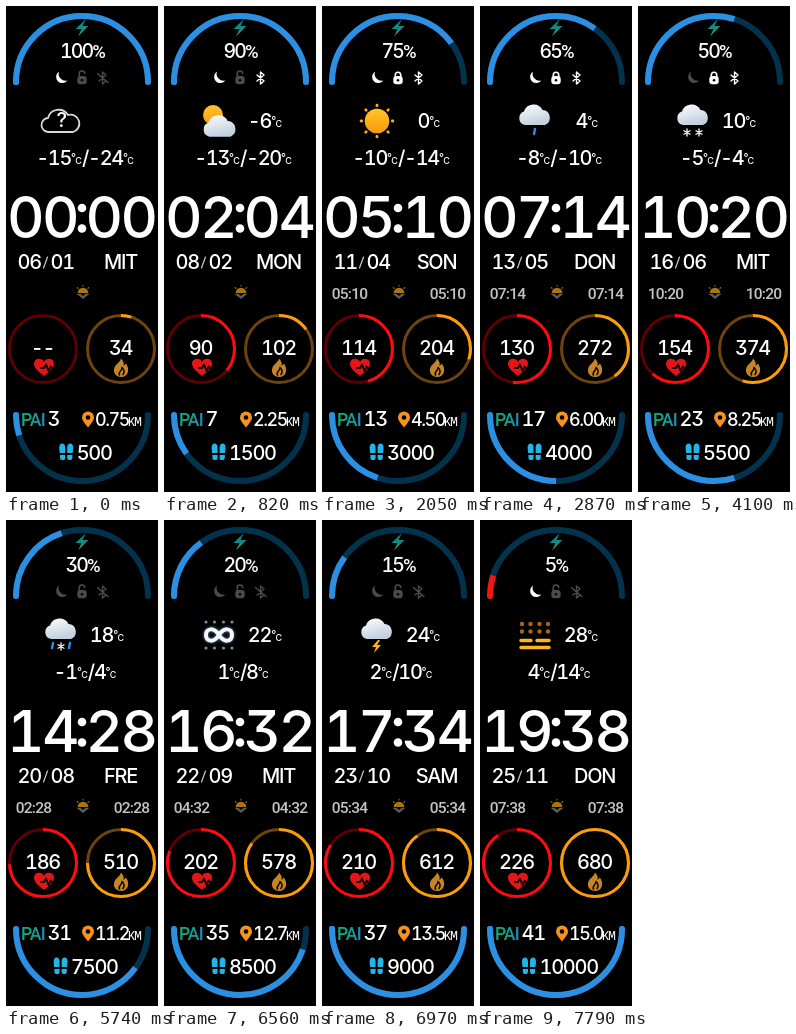
An HTML page for the animation above (8.2 s loop, 152x486 px).

```html
<!DOCTYPE html>
<html lang="de">
<head>
<meta charset="utf-8">
<title>Watch face</title>
<style>
html, body { margin: 0; width: 100%; height: 100%; overflow: hidden; background: #000; }
svg { display: block; width: 152px; height: 486px; }
text {
  font: 500 20px Inter, sans-serif; fill: #fff; letter-spacing: -1.3px;
  font-feature-settings: "tnum", "cv09";
}
.mid { text-anchor: middle; }
.end { text-anchor: end; }
.time { font-size: 58px; letter-spacing: -2.7px; }
.sun { font: 500 15.5px Roboto, sans-serif; letter-spacing: -.8px; fill: #c4c4c4; }
.deg { font-size: 11px; letter-spacing: -.8px; }
.unit { font-size: 9px; letter-spacing: 0; }
.level { font-size: 19.5px; letter-spacing: -1.9px; }
.pct { font: 500 18.5px Roboto, sans-serif; letter-spacing: 0; }
.pai { font: 500 17.5px Roboto, sans-serif; letter-spacing: -.8px; fill: url(#pai); }
.km { font: 500 12.5px "Noto Sans Mono", monospace; letter-spacing: -1.2px; }
.dist { font-size: 18px; letter-spacing: -1.5px; }
</style>
</head>
<body>
<svg viewBox="0 0 152 486">
  <defs>
    <linearGradient id="pai"><stop stop-color="#12ad7a"/><stop offset=".55" stop-color="#139f8c"/><stop offset="1" stop-color="#1a8fc8"/></linearGradient>
    <linearGradient id="bolt" x2="0" y2="1"><stop stop-color="#176f86"/><stop offset="1" stop-color="#16a37d"/></linearGradient>
    <linearGradient id="cloud" x2=".4" y2="1"><stop stop-color="#fff"/><stop offset="1" stop-color="#c3d0df"/></linearGradient>
    <linearGradient id="gold" x2="0" y2="1"><stop stop-color="#ffc52e"/><stop offset="1" stop-color="#f89a08"/></linearGradient>
    <filter id="glow" x="-30%" y="-30%" width="160%" height="160%"><feGaussianBlur stdDeviation="1.5"/></filter>
  </defs>
  <g id="face"></g>
</svg>
<script>
const STEP = 410, COUNT = 20;
const DAYS = ['SON', 'MON', 'DIE', 'MIT', 'DON', 'FRE', 'SAM'];
const BLUE = '#2d8fe2', NAVY = '#03324d';
const face = document.getElementById('face');
const pad = n => String(n).padStart(2, '0');

const text = (x, y, body, cls = '') => `<text x="${x}" y="${y}" class="${cls}">${body}</text>`;
const shape = (d, fill) => `<path d="${d}" fill="${fill}"/>`;
const line = (d, color, w = 2) =>
  `<path d="${d}" fill="none" stroke="${color}" stroke-width="${w}" stroke-linecap="round" stroke-linejoin="round"/>`;
const dot = (x, y, r, fill) => `<circle cx="${x}" cy="${y}" r="${r}" fill="${fill}"/>`;
const at = (x, y, body, scale = 1) => `<g transform="translate(${x} ${y}) scale(${scale})">${body}</g>`;
const celsius = '<tspan class="deg" dy="-4">°</tspan><tspan class="unit" dy="3">C</tspan>';

// Track plus its filled part, part from 0 to 1
function gauge(d, part, dim, bright, w, cap) {
  const base = `d="${d}" fill="none" stroke-width="${w}"`;
  return `<path ${base} stroke="${dim}" stroke-linecap="${cap}"/>` + (part > 0
    ? `<path ${base} stroke="${bright}" stroke-linecap="${part < 1 ? 'butt' : cap}" pathLength="100" stroke-dasharray="${part * 100} 200"/>` : '');
}
const ring = (x, part, dim, bright) =>
  gauge(`M${x} 309.5a33.5 33.5 0 0 1 0 67a33.5 33.5 0 0 1 0-67`, part, dim, bright, 3, 'butt');
const bow = (y, sweep, part, color) =>
  gauge(`M10 ${y}a66 66 0 0 ${sweep} 132 0`, part, NAVY, color, 6, 'round') + dot(10, y, 3, color);

// Weather parts, centred on 0,0
const cloud = shape('M-10 4a7 7 0 0 1-1-13.5a10 10 0 0 1 18.5-1.5a7.8 7.8 0 0 1 2.5 15z', 'url(#cloud)');
const each = (xs, draw) => xs.map(draw).join('');
const drops = (...xs) => each(xs, x => line(`M${x} 8l-1 5`, '#2f8fe8', 2.4));
const flakes = (...xs) => each(xs, x =>
  line(`M${x} 8v7M${x - 3} 9.8l6 3.4M${x - 3} 13.2l6-3.4`, '#fff', 1.3));
const bolt = shape('M1 5l-6 7h4l-2 6 7-8h-4l3-5z', '#ffb51c');
const rows = (ys, color, r = 2.2) => each(ys, y => each([-13, -4.5, 4.5, 13], x => dot(x, y, r, color)));
const bars = color => line('M-14 5.5h10M2 5.5h12M-14 12.5h28', color, 3.5);
const rays = each([...Array(8).keys()], i =>
  `<g transform="rotate(${i * 45})">${line('M0-15.3v-.6', '#ffae18', 2.8)}</g>`);
const loop = 'M0 0C-5-8-13-7-13 0S-5 8 0 0S13-7 13 0S5 8 0 0';

const WEATHER = [
  dot(-6, -6, 10, 'url(#gold)') + at(1, 11.5, cloud, 1.04),
  dot(-6, -7, 8, 'url(#gold)') + cloud + drops(-6, 6),
  dot(-6, -7, 8, 'url(#gold)') + cloud + flakes(0),
  dot(0, 0, 12.3, 'url(#gold)') + rays,
  at(0, 5, cloud),
  cloud + drops(0),
  cloud + flakes(0),
  cloud + drops(-6, 6),
  cloud + flakes(-6, 6),
  cloud + flakes(-10, 0, 10),
  cloud + drops(-9, 0, 9),
  rows([-11, -3.5], '#a4610c') + bars('#ffae18'),
  cloud + drops(-8, 9) + flakes(0),
  cloud + line('M-13 9h26M-9 14h18', '#b9c6d6', 2.2),
  rows([-13, 13], '#7d8ba0', 1.6) +
    `<g filter="url(#glow)" opacity=".6">${line(loop, '#7fa6dc', 5)}</g>` + line(loop, '#f4f7fb', 4),
  cloud + bolt,
  cloud + flakes(-10, 0, 10) + line('M-9 18h18', '#b9c6d6', 1.5),
  rows([-11, -3.5], '#a8640f') + bars('#ffb41c')
];
const UNKNOWN = line('M-12 11a7 7 0 0 1-1-14a11 11 0 0 1 20-3a8.7 8.7 0 0 1 5 17z', '#d9d9d9', 1.8) +
  text(0, 6, '?', 'mid');

function status(k) {
  const color = on => on ? '#fff' : '#4b4b4b';
  const lock = k > 3 && k < 13, c = color(lock);
  const radio = k > 0 && k < 12, b = color(radio);
  return shape('M53 65.5a6.3 6.3 0 1 0 8.5 9a7 7 0 0 1-8.500-9z', color(k < 8 || k > 17)) +
    `<rect x="71.300" y="70" width="9.400" height="8.200" rx="3" fill="${c}"/>` +
    line(lock ? 'M73.300 71v-2a2.700 2.700 0 0 1 5.400 0v2' : 'M73.300 71v-3a2.700 2.700 0 0 1 5.400-.500', c, 1.6) +
    dot(76, 74.2, 1.3, '#000') +
    line('M93 69l7 6-3.500 3v-12l3.500 3-7 6' + (radio ? '' : 'M91.500 67.500l10.500 9'), b, 1.4);
}

const icons =
  shape('M80 13L69.5 23h6L72 30.5 82.5 20h-6z', 'url(#bolt)') +
  at(77, 287,
    shape('M-6.500 0a6.500 6.500 0 0 1 13 0z', '#a87512') +
    line('M0-8.500v-1M-6-5.500l-1-1M6-5.500l1-1', '#a87512', 1.3) +
    shape('M-8 .800h5l3 3 3-3h5l-8 6.500z', '#5c5c5c'), .82) +
  shape('M38 370C31 364.500 28 361.500 28 357.500C28 352 36 351 38 356C40 351 48 352 48 357.500C48 361.500 45 364.500 38 370z', '#e31515') +
  line('M35 362h3l2-3.500 2.500 6.500 2.200-4.500 1.300 1.500h4', '#000', 1.8) +
  shape('M115 352.500C118 356 118 357.500 117.500 360L120 357.500C124.500 364 121.500 371 115.500 371C108.500 371 106 365 109.500 359.500C112 357 114.500 355 115 352.500z', '#c58428') +
  line('M113.500 369c-2-3 3-4.500 2.500-7.500c3 3 2.500 5 1 7', '#100a02', 1.6) +
  `<path d="M82 421.500C78 416.500 76 414 76 411.500a6 6 0 0 1 12 0C88 414 86 416.500 82 421.500z" fill="#f59220"/>` +
  dot(82, 411.5, 2.3, '#000');

const foot = 'M1 4.500a3 4.500 0 0 1 6 0V9.500H1.500zM1.800 11.500H7V14a2.600 2.600 0 0 1-5.200 0z';
const feet = shape(foot, '#22b5e8') +
  `<g transform="matrix(-1 0 0 1 16 0)">${shape(foot, '#22b5e8')}</g>`;

function draw(k) {
  const battery = 100 - 5 * k, steps = 500 + 500 * k;
  const tenths = (v, unit) => Math.min(1, Math.floor(v / unit + 1) / 10);
  const day = 6 + k, month = 1 + Math.round(k * 10 / 19);
  const weekday = DAYS[new Date(2021, month - 1, day).getDay()];
  const pulse = 74 + 8 * k, energy = 34 + 34 * k;
  const km = (.75 * (k + 1)).toFixed(2).slice(0, 4);
  const clock = `${pad((k + 11) % 12 + 1)}:${pad(2 * k)}`;
  const width = String(steps).length * 11.2;
  const left = 78.5 - (19 + width) / 2;
  const charge = tenths(battery, 10);

  return bow(76, 1, charge, charge > .1 ? BLUE : '#f51414') +
    bow(409, 0, tenths(steps, 1000), BLUE) +
    text(77, 51.5, `${battery}<tspan class="pct">%</tspan>`, 'level mid') +
    status(k) +
    at(55, 115, WEATHER[k - 2] || UNKNOWN) +
    (k > 1 ? text(118, 122, 2 * k - 10 + celsius, 'end') : '') +
    text(79, 159, `${k - 15}${celsius}<tspan dy="1">/</tspan>${2 * k - 24}${celsius}`, 'mid') +
    text(36, 232, pad(k), 'time mid') +
    text(114.5, 232, pad(2 * k), 'time mid') +
    dot(76, 202, 4.3, '#fff') + dot(76, 222.5, 4.3, '#fff') +
    text(11.5, 263, pad(day)) + line('M37.500 262l4-11', '#ccc', 1.2) + text(44.5, 263, pad(month)) +
    text(114.5, 263, weekday, 'mid') +
    (k > 2 ? text(27.5, 293, clock, 'sun mid') + text(125.5, 293, clock, 'sun mid') : '') +
    ring(37, k ? pulse / 250 : 0, '#5c0004', '#ff0b10') +
    ring(115, energy / 680, '#6c440c', '#fb9c0c') +
    text(36.5, 348.5, k ? pulse : '--', 'mid') +
    text(114.5, 348.5, energy, 'mid') +
    icons +
    text(15, 420, 'PAI', 'pai') + text(41.5, 420, 3 + 2 * k) +
    text(89, 420, km, 'dist') + text(134.5, 420, 'KM', 'km end') +
    at(left, 437.5, feet) + text(left + 18.5, 454, steps);
}

let shown = -1;
function tick() {
  const k = Math.floor(performance.now() / STEP) % COUNT;
  if (k !== shown) face.innerHTML = draw(shown = k);
  requestAnimationFrame(tick);
}
tick();
</script>
</body>
</html>
```
